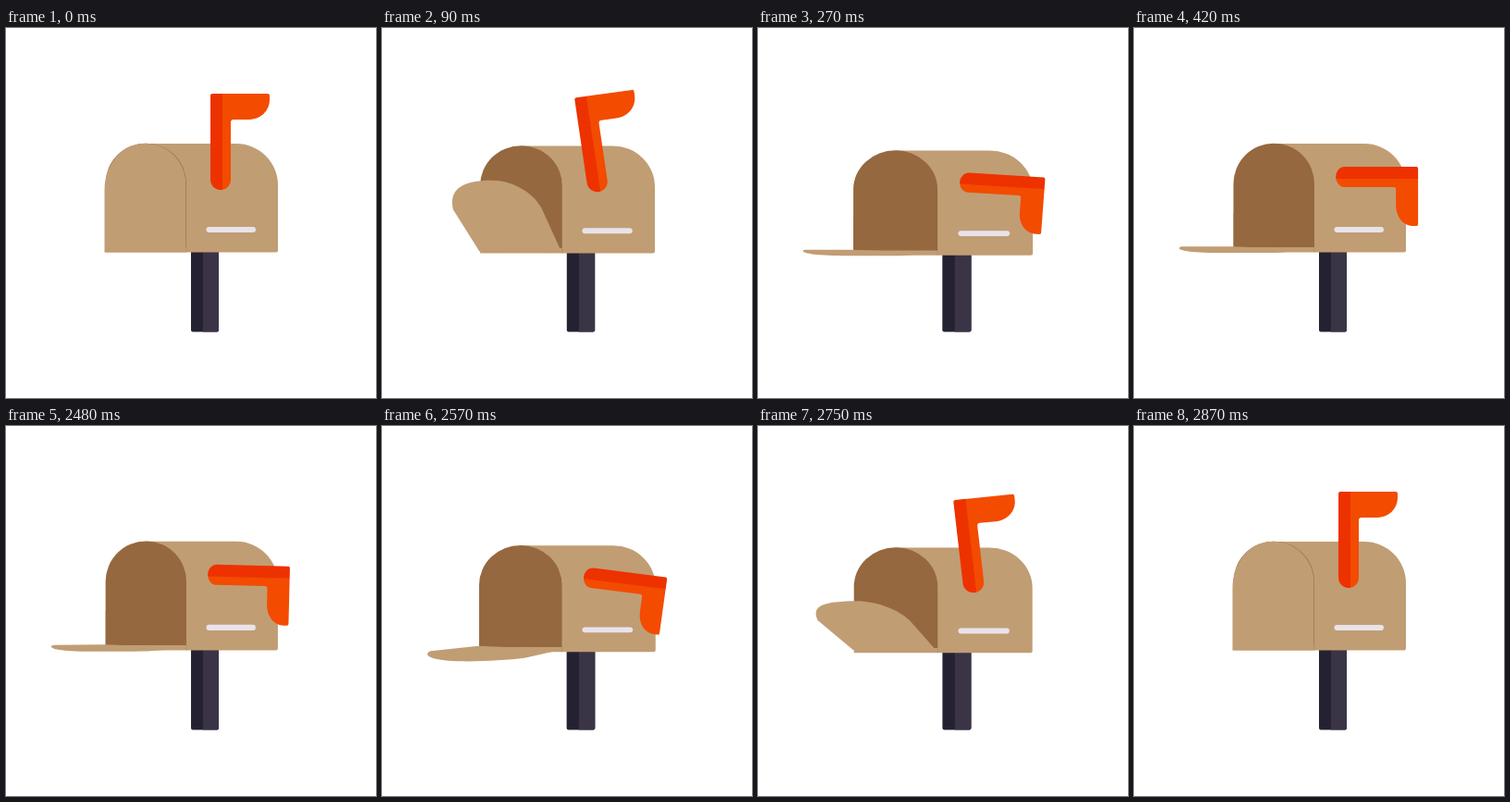
An HTML page for the animation above (3.9 s loop, 400 by 400 pixels).

```html
<!DOCTYPE html>
<html lang="en">
<head>
<meta charset="utf-8">
<title>Mailbox</title>
<style>
  html, body { margin: 0; width: 100%; height: 100%; overflow: hidden; background: #fff; }
  svg { display: block; width: 100%; height: 100%; }
</style>
</head>
<body>
<svg viewBox="0 0 400 400">
  <g id="box">
    <rect x="200" y="238" width="30" height="90.500" rx="2" fill="#242230"/>
    <path fill="#3b3346" d="M213 238H230V326.500q0 2-2 2H213z"/>
    <path fill="#c19d74" d="M151 125H249A45 45 0 0 1 294 170V240.500q0 2-2 2H107.500V200H151z"/>
    <path fill="#95683f" d="M107.500 237V168.500a43.750 43.750 0 0 1 87.500 0V237z"/>
    <path id="door" fill="#c19d74"/>
    <path fill="none" stroke="#ac8860" stroke-width=".6" d="M195 237V242.500"/>
    <rect x="216.500" y="215" width="53.500" height="6" rx="3" fill="#e9e3ea"/>
    <g id="flag">
      <path fill="#f34b00" d="M1.500-93H51q2 0 2 2V-87C53-74 43-65 30-65H14q-3 0-3 3V0A11 11 0 0 1 0 11L1.500-40z"/>
      <path fill="#ed3200" d="M-11-91q0-2 2-2H2V10.800A11 11 0 0 1-11 0z"/>
    </g>
  </g>
</svg>
<script>
const LOOP = 3900, STEP = 30, OPENED = 420, CLOSING = 2480;
const TOP = 236.3, BOTTOM = 243;
const $ = id => document.getElementById(id);
const box = $('box'), door = $('door'), flag = $('flag');

// Key points of the door: closed x, closed y, flat x, flat y
const points = [
  [106.5, 242.5, 107, TOP], [106.5, 175, 53, TOP],
  [106.5, 150, 46, TOP], [123, 124.8, 42, BOTTOM], [150.5, 124.8, 92, BOTTOM],
  [175, 124.8, 112, BOTTOM], [194.4, 144.5, 136, BOTTOM], [194.4, 169, 153, BOTTOM],
  [194.4, 242.5, 194.8, 240]
];

const mix = (a, b, k) => a + (b - a) * k;

// cubic-bezier(.68, -.55, .265, 1.55)
const bezier = (a, b, u) => 3 * (1 - u) * u * ((1 - u) * a + u * b) + u ** 3;
function ease(x) {
  if (x <= 0) return 0;
  if (x >= 1) return 1;
  let lo = 0, hi = 1;
  for (let i = 0; i < 24; i++) {
    const u = (lo + hi) / 2;
    if (bezier(0.68, 0.265, u) < x) lo = u; else hi = u;
  }
  return bezier(-0.55, 1.55, lo);
}

// lift: 1 is shut, 0 is flat, below 0 the door sags
function doorPath(lift, squash) {
  const reach = (1 - lift * lift) * (1 - 0.1 * squash);
  const p = points.map(([x, y, flatX, flatY]) =>
    `${mix(x, flatX, reach).toFixed(2)} ${mix(flatY, y, lift).toFixed(2)}`);
  return `M${p[0]}L${p[1]}C${p.slice(2, 8).join(' ')}L${p[8]}Z`;
}

function draw(t) {
  const opening = t < CLOSING;
  const since = Math.floor((opening ? t : t - CLOSING) / STEP) * STEP;
  const x = opening ? (t >= OPENED ? 1 : since / 405) : Math.min(1, (since + 8) / 398);

  const squash = x < 0.5 ? ease(2 * x) : 1 - ease(2 * x - 1);
  box.setAttribute('transform',
    `translate(217 328) scale(${1 + 0.04 * squash} ${1 - 0.037 * squash}) translate(-217 -328)`);

  const turn = opening ? ease(x) : 1 - ease(x);
  flag.setAttribute('transform',
    `translate(${mix(232, 227.6, turn)} ${mix(164, 161, turn)}) rotate(${90 * turn}) scale(1 ${mix(1, 0.855, turn)})`);

  const lift = opening
    ? 1 - ease(2 * x)
    : ease((x - 0.45) / 0.5) - 0.12 * Math.sin(Math.PI * x);
  door.setAttribute('d', doorPath(Math.min(1, lift), squash));
}

const start = performance.now();
function tick() {
  draw((performance.now() - start) % LOOP);
  requestAnimationFrame(tick);
}
tick();
</script>
</body>
</html>
```
